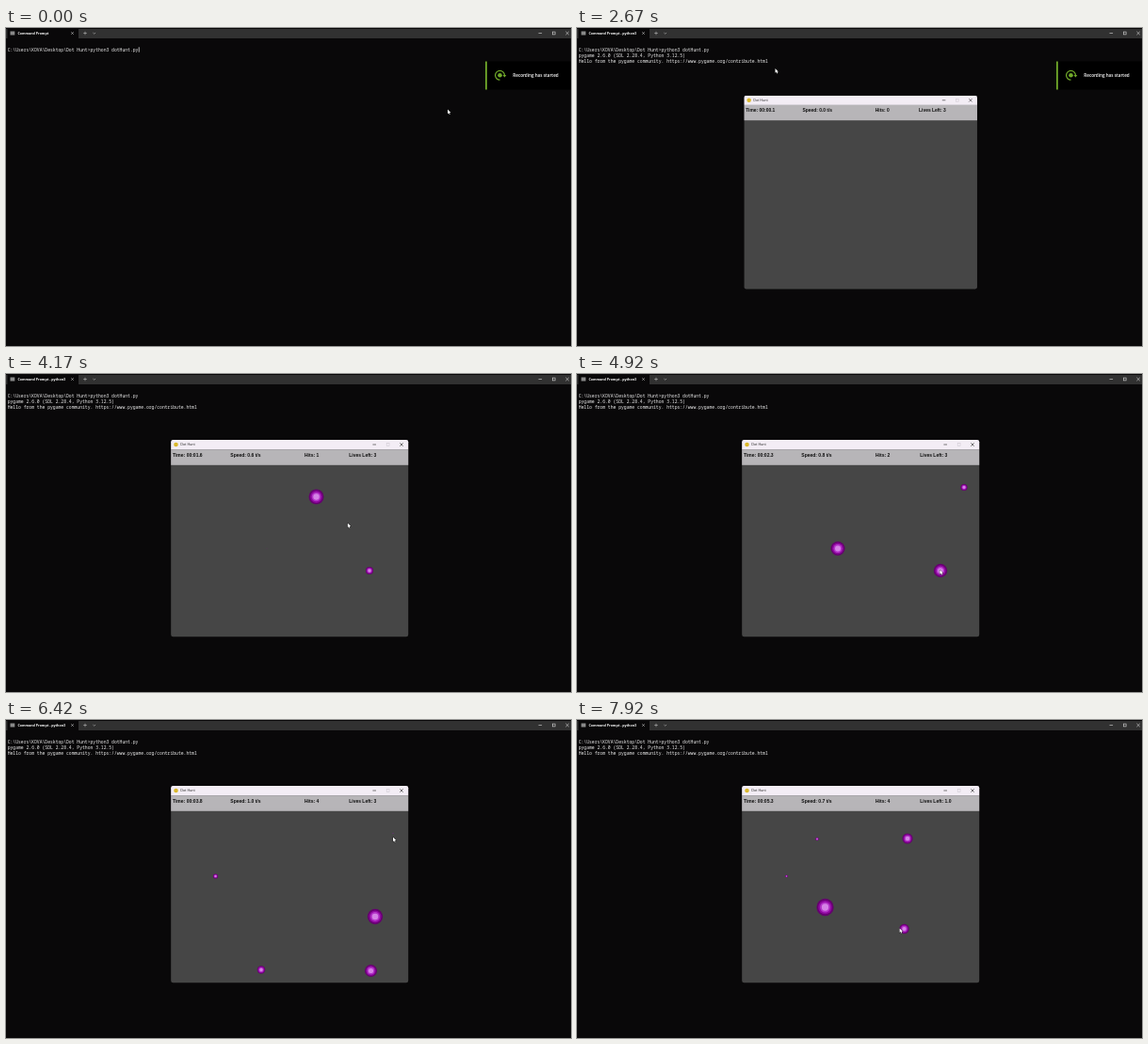
Recreate the animation shown at these times as an HTML page with a canvas. Size 600 px wide and 338 px high, loop 8 s.

```html
<!DOCTYPE html>
<html lang="en">
<head>
<meta charset="utf-8">
<title>Target practice</title>
<style>
  html, body { margin: 0; width: 100%; height: 100%; overflow: hidden; background: #090809; }
  canvas { display: block; width: 600px; height: 338px; }
</style>
</head>
<body>
<canvas id="stage"></canvas>
<script>
const LOOP = 8000, FPS = 12;
const GAME_START = 2550, SPAWN_GAP = 400, LIFE = 1900, MAX_R = 9.3;
const UI = '"Open Sans", sans-serif';
const MONO = '4.73px "Noto Sans Mono", monospace';
const BOLD = 'bold 5px "Liberation Sans", Arial, sans-serif';
const GREEN = '#70a82a', LIGHT = '#ddd';

const canvas = document.getElementById('stage');
const ctx = canvas.getContext('2d');
const ratio = window.devicePixelRatio || 1;
canvas.width = 600 * ratio;
canvas.height = 338 * ratio;

// Targets appear at a steady pace; the first few are clicked, the rest run out.
const clicks = [4100, 4420, 4950, 5770];
const targets = [
  [367, 162], [329.5, 130.5], [386, 209], [277, 185.5], [411, 120.5], [271, 265.5], [392, 209],
  [387.5, 266.5], [222.5, 166], [347.5, 222], [263.5, 199], [351, 126], [255, 126.5]
].map(([x, y], i) => ({ x, y, hit: clicks[i], born: GAME_START + SPAWN_GAP * (i + 1) }));

// The pointer drifts to the prompt, then visits each clicked target.
const stops = [
  [0, 469, 86.5], [210, 525, 120], [580, 214, 46], [2200, 210.5, 43], [2800, 210.5, 43],
  ...clicks.map((time, i) => [time, targets[i].x, targets[i].y]),
  [6400, 411, 124.5], [LOOP, 342, 222]
];

const clamp = v => Math.max(0, Math.min(1, v));
const ease = v => v * v * (3 - 2 * v);

function rect(x, y, w, h, fill) {
  ctx.fillStyle = fill;
  ctx.fillRect(x, y, w, h);
}

function disc(x, y, r, fill) {
  ctx.fillStyle = fill;
  ctx.beginPath();
  ctx.arc(x, y, r, 0, Math.PI * 2);
  ctx.fill();
}

function text(str, x, y, font, fill) {
  ctx.font = font;
  ctx.fillStyle = fill;
  ctx.fillText(str, x, y);
}

function line(x0, y0, x1, y1, color) {
  ctx.strokeStyle = color;
  ctx.lineWidth = 0.6;
  ctx.beginPath();
  ctx.moveTo(x0, y0);
  ctx.lineTo(x1, y1);
  ctx.stroke();
}

function cross(x, y, r, color) {
  line(x - r, y - r, x + r, y + r, color);
  line(x - r, y + r, x + r, y - r, color);
}

function box(x, y, r, color) {
  ctx.strokeStyle = color;
  ctx.lineWidth = 0.6;
  ctx.strokeRect(x - r, y - r, 2 * r, 2 * r);
}

// Minimise, maximise and close, spaced evenly.
function windowButtons(x, y, color, boxColor) {
  line(x - 1.8, y, x + 1.8, y, color);
  box(x + 14.4, y, 1.4, boxColor);
  cross(x + 28.8, y, 1.7, color);
}

function drawTerminal(t) {
  rect(0, 0, 600, 338, '#090809');
  rect(0, 1, 600, 10, '#313131');
  rect(1.5, 1, 75.5, 10, '#090809');
  rect(4.5, 3.5, 4.8, 4, '#8a8a8a');
  text(t < 1750 ? 'Command Prompt' : 'Command Prompt - python3', 12.5, 7, 'bold 3.6px ' + UI, '#fff');
  cross(70.5, 5.5, 1.2, LIGHT);
  line(82.2, 5.5, 85.8, 5.5, '#bbb');
  line(84, 3.7, 84, 7.3, '#bbb');
  line(92.3, 5, 93.7, 6.2, '#bbb');
  line(93.7, 6.2, 95.1, 5, '#bbb');
  windowButtons(567.3, 5.5, LIGHT, LIGHT);

  const output = ['C:\\Users\\KOVA\\Desktop\\Dot Hunt>python3 dotHunt.py'];
  if (t > 2160) output.push(
    'pygame 2.6.0 (SDL 2.28.4, Python 3.12.5)',
    'Hello from the pygame community. https://www.pygame.org/contribute.html');
  output.forEach((str, i) => text(str, 1.7, 24.6 + i * 6.4, MONO, '#eee'));
  const caretOn = t < 1750 && Math.floor((t + 85) / 500) % 2 === 0;
  if (caretOn) rect(140.8, 20.3, 0.7, 5.4, '#fff');
}

function drawNotice(t) {
  ctx.save();
  ctx.translate(91 * ease(clamp((t - 3370) / 380)), 0);
  rect(509, 35.5, 91, 30, '#000');
  rect(509, 35.5, 1.8, 30, GREEN);
  ctx.globalAlpha = 1 - clamp((t - 3200) / 200);
  disc(524.5, 50.3, 2.3, GREEN);
  ctx.strokeStyle = GREEN;
  ctx.lineWidth = 1.3;
  ctx.beginPath();
  ctx.arc(524.5, 50.3, 4.9, Math.PI * 0.5, Math.PI * 2);
  ctx.stroke();
  ctx.fillStyle = GREEN;
  ctx.beginPath();
  ctx.moveTo(527.5, 50);
  ctx.lineTo(531.3, 50);
  ctx.lineTo(529.4, 52.4);
  ctx.fill();
  text('Recording has started', 538.3, 52.4, '600 4.6px ' + UI, '#fff');
  ctx.restore();
}

function drawTarget({ x, y, hit, born }, t) {
  const age = t - born;
  if (age <= 0 || age >= LIFE || t >= hit) return;
  const r = MAX_R * (1 - Math.abs(age / LIFE * 2 - 1));
  ['#65006f', '#8f08a0', '#b435c8', '#d583e6'].forEach((c, i) => disc(x, y, r * (1 - i * 0.2), c));
}

function drawStats(t) {
  const secs = Math.max(0, t - GAME_START) / 1000;
  const hits = clicks.filter(time => time <= t).length;
  const missed = targets.filter(g => !g.hit && g.born + LIFE <= t).length;
  const lives = missed ? (3 - missed / 2).toFixed(1) : '3';
  const clock = (Math.floor(secs * 10) / 10).toFixed(1).padStart(4, '0');
  const stat = (str, x) => text(str, x, 87.8, BOLD, '#101010');
  stat('Time: 00:' + clock, 177);
  stat(`Speed: ${(secs ? hits / secs : 0).toFixed(1)} t/s`, 238.3);
  stat('Hits: ' + hits, 317);
  stat('Lives Left: ' + lives, 364.2);
}

function drawGame(t) {
  if (t < 2575) return;
  const scale = 1 - 0.16 * (1 - clamp((t - 2500) / 250)) ** 2;
  ctx.save();
  ctx.globalAlpha = clamp((t - 2500) / 160);
  ctx.translate(301.2, 174.7);
  ctx.scale(scale, scale);
  ctx.translate(-301.2, -174.7);
  ctx.beginPath();
  ctx.roundRect(175.2, 70, 252, 209.3, 2.2);
  ctx.clip();
  rect(175, 70, 253, 210, '#464646');
  rect(175, 70, 253, 10.2, '#f3edf5');
  rect(175, 80.2, 253, 16.6, '#b7b5b8');
  disc(180.5, 75, 2.3, '#d9b82c');
  text('Dot Hunt', 185.2, 76.4, '3.7px ' + UI, '#222');
  windowButtons(391.2, 75, '#222', '#d0cad2');
  drawStats(t);
  targets.forEach(g => drawTarget(g, t));
  ctx.restore();
}

function drawPointer(t) {
  const i = stops.findIndex(s => s[0] > t);
  const [t0, x0, y0] = stops[i - 1], [t1, x1, y1] = stops[i];
  const k = ease((t - t0) / (t1 - t0));
  ctx.save();
  ctx.translate(x0 + (x1 - x0) * k, y0 + (y1 - y0) * k);
  ctx.beginPath();
  [[0, 0], [0, 4.7], [1.1, 3.8], [1.9, 5.5], [2.7, 5.1], [2, 3.5], [3.4, 3.4]]
    .forEach(([x, y]) => ctx.lineTo(x, y));
  ctx.closePath();
  ctx.strokeStyle = '#000';
  ctx.lineWidth = 0.7;
  ctx.stroke();
  ctx.fillStyle = '#fff';
  ctx.fill();
  ctx.restore();
}

function frame() {
  const step = 1000 / FPS;
  const t = Math.floor((performance.now() + 4) % LOOP / step) * step;
  ctx.setTransform(ratio, 0, 0, ratio, 0, 0);
  drawTerminal(t);
  drawNotice(t);
  drawGame(t);
  drawPointer(t);
  requestAnimationFrame(frame);
}
frame();
</script>
</body>
</html>
```
